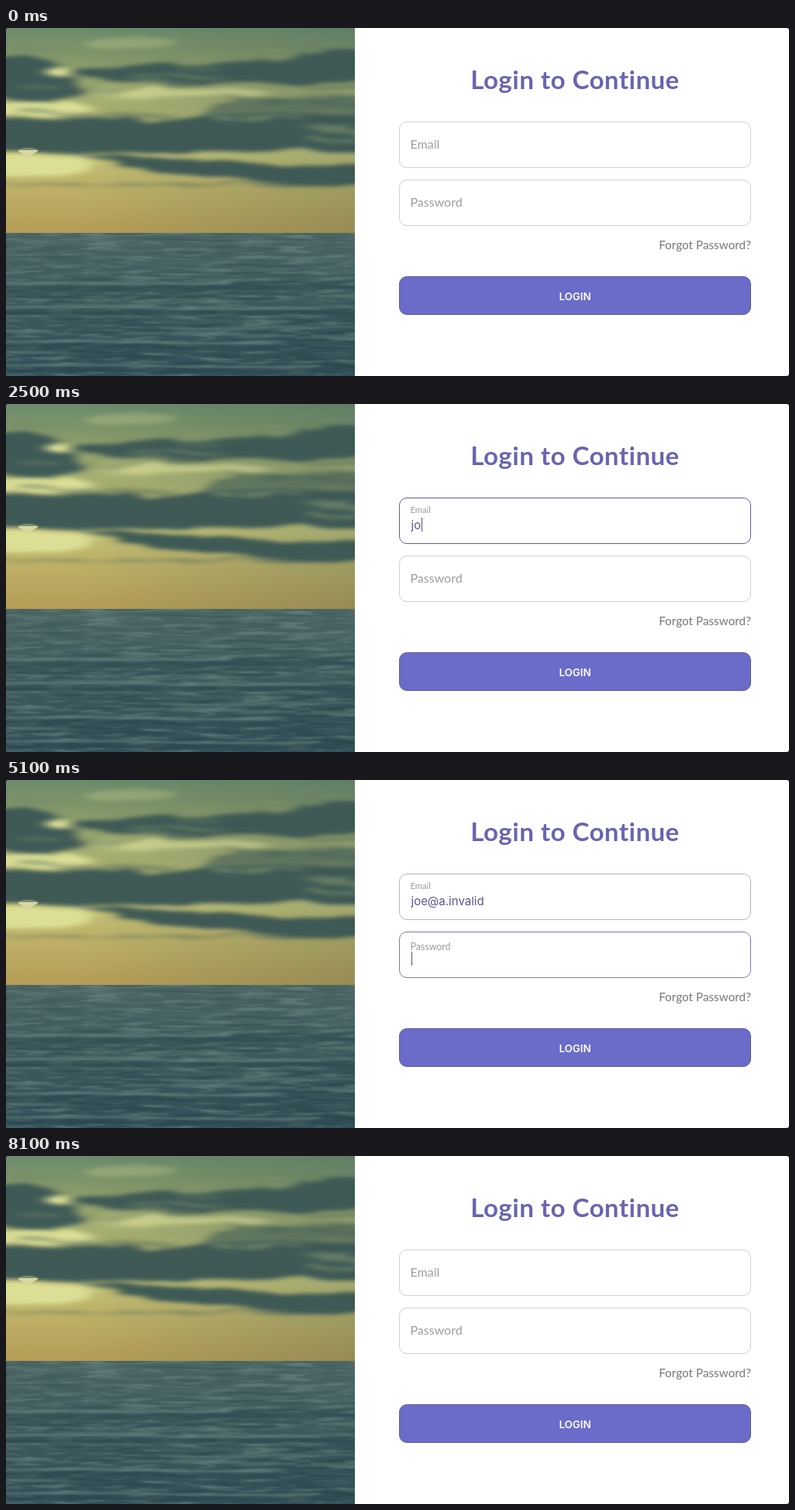
An HTML page that plays this animation: 1010 px wide and 450 px high, repeating every 8.2 s.

```html
<!DOCTYPE html>
<html lang="en">
<head>
<meta charset="utf-8">
<title>Login form</title>
<style>
  html, body { margin: 0; width: 100%; height: 100%; overflow: hidden; background: #fff; }
  svg { position: absolute; left: 0; top: 0; }
  #photo { will-change: transform; }
  filter { color-interpolation-filters: sRGB; }
  text { font-family: Lato, sans-serif; }
  .title { font-size: 33px; font-weight: 700; letter-spacing: .5px; fill: #6965b0; }
  .label { font-size: 16px; fill: #9b9b9f; }
  .link { font-size: 15.3px; fill: #77777b; }
  .button { font: 600 13.3px Inter, sans-serif; fill: #fff; }
  .value { font: 400 15px Inter, sans-serif; fill: #5c5494; }
</style>
</head>
<body>
<svg id="photo" width="450" height="450">
  <defs>
    <linearGradient id="sky" x2="0" y2="1">
      <stop offset="0" stop-color="#6c8b6c"/>
      <stop offset=".12" stop-color="#7f9569"/>
      <stop offset=".36" stop-color="#a5ad70"/>
      <stop offset=".62" stop-color="#c3c278"/>
      <stop offset=".75" stop-color="#bfb469"/>
      <stop offset="1" stop-color="#b59c55"/>
    </linearGradient>
    <linearGradient id="sea" x2="0" y2="1">
      <stop offset="0" stop-color="#4a6462"/>
      <stop offset=".5" stop-color="#3d595d"/>
      <stop offset="1" stop-color="#314e57"/>
    </linearGradient>
    <linearGradient id="shade">
      <stop offset=".2" stop-color="#3c5853" stop-opacity="0"/>
      <stop offset="1" stop-color="#3c5853" stop-opacity=".25"/>
    </linearGradient>
    <filter id="cloudy" x="-10%" y="-10%" width="120%" height="120%">
      <feTurbulence type="fractalNoise" baseFrequency=".012 .05" numOctaves="3" seed="4"/>
      <feDisplacementMap in="SourceGraphic" scale="16" xChannelSelector="R" yChannelSelector="G"/>
      <feGaussianBlur stdDeviation="8 2.6"/>
    </filter>
    <filter id="ripples" x="0" y="0" width="100%" height="100%">
      <feTurbulence type="fractalNoise" baseFrequency=".02 .2" numOctaves="4" seed="9"/>
      <feColorMatrix values="0 0 0 0 .46  0 0 0 0 .57  0 0 0 0 .54  3 0 0 0 -1.35"/>
    </filter>
    <filter id="soft" x="-10%" y="-10%" width="120%" height="120%">
      <feGaussianBlur stdDeviation="4 1.2"/>
    </filter>
  </defs>
  <rect width="450" height="266" fill="url(#sky)"/>
  <g filter="url(#cloudy)">
    <g fill="#3f5a56">
      <path d="M-20 36C40 32 70 48 90 65S110 92 60 95S10 93 -20 90Z"/>
      <path d="M80 56C140 38 200 50 290 44S400 30 470 26V64C390 76 330 68 260 74S140 70 80 56Z"/>
      <path d="M270 98C330 84 400 92 470 88V122H240Z" opacity=".6"/>
      <path d="M-20 118C90 112 150 124 230 116S330 108 470 108V160C360 163 260 156 180 162S60 160 -20 158Z"/>
      <path d="M85 169C180 163 250 176 470 178V204C340 206 230 190 85 169Z"/>
      <path d="M-20 201H470V204H-20Z" opacity=".5"/>
    </g>
    <g fill="#dbde95">
      <ellipse cx="65" cy="58" rx="16" ry="7"/>
      <ellipse cx="160" cy="20" rx="60" ry="6" opacity=".3"/>
      <ellipse cx="40" cy="104" rx="75" ry="8"/>
      <ellipse cx="220" cy="84" rx="120" ry="5" opacity=".8"/>
      <ellipse cx="0" cy="178" rx="110" ry="13"/>
    </g>
    <g id="wisps" fill="none" opacity=".4"></g>
  </g>
  <rect width="450" height="266" fill="url(#shade)"/>
  <path d="M15 158Q28 152 42 158Q28 171 15 158Z" fill="#d8d8a6"/>
  <path d="M15 158Q28 152 42 158Z" fill="#7d8a6b"/>
  <rect y="265" width="450" height="185" fill="url(#sea)"/>
  <rect y="265" width="450" height="185" filter="url(#ripples)" opacity=".5"/>
  <g id="waves" filter="url(#soft)" fill="none" opacity=".55"></g>
</svg>

<svg id="form" width="1010" height="450">
  <path d="M0 0h2L0 2ZM1008 0h2v2ZM1010 448v2h-2Z" fill="#333"/>
  <text class="title" x="734" y="79" text-anchor="middle">Login to Continue</text>
  <g id="fields"></g>
  <text class="link" x="961" y="286" text-anchor="end">Forgot Password?</text>
  <rect x="507.5" y="321.5" width="453" height="49" rx="9.5" fill="#6b6bc9" stroke="#5e5c9c"/>
  <text class="button" x="734" y="352" text-anchor="middle">LOGIN</text>
  <text class="value" id="value" x="522.5" y="162"></text>
  <rect id="caret" width="1" height="18" fill="#555566"/>
</svg>

<script>
const LOOP = 8200, STEP = 100, FADE = 200;
const EMAIL = 'joe@a.invalid', CLEARED = 6300;
const byId = id => document.getElementById(id);

// Spans are [from, to] in ms; a filled field keeps its label raised.
const fields = [
  { name: 'Email', top: 121.5, focus: [[500, 950], [1450, 5000], [5800, 7800]], raised: [[500, 950], [1450, 7800]] },
  { name: 'Password', top: 196.5, focus: [[950, 1450], [5000, 5800]], raised: [[950, 1450], [5000, 5800]] }
];

byId('fields').innerHTML = fields.map(f =>
  `<rect x="507.5" y="${f.top}" width="453" height="59" rx="9.5" fill="#fff"/>
   <text class="label">${f.name}</text>`).join('');
fields.forEach((f, i) => [f.box, f.label] = [...byId('fields').children].slice(i * 2, i * 2 + 2));

function paintPhoto() {
  let seed = 7;
  const random = () => (seed = seed * 16807 % 2147483647) / 2147483647;
  const streak = (x, y, length, color, width) => {
    const bend = (random() - .5) * 8;
    return `<path d="M${x} ${y}q${length / 4} ${bend} ${length / 2} 0t${length / 2} 0" stroke="${color}" stroke-width="${width}"/>`;
  };
  const scatter = (count, top, height, dark, light, thickness) => Array.from({ length: count }, () => {
    const depth = random();
    return streak(random() * 510 - 60, top + depth * height, 40 + random() * 130,
      random() < .6 ? dark : light, 1 + depth * thickness);
  }).join('');

  byId('wisps').innerHTML = scatter(45, 25, 130, '#3c5754', '#c3ca88', 5);
  byId('waves').innerHTML = scatter(110, 268, 180, '#294349', '#5f7975', 3) +
    [336, 368, 412, 443].map(y => streak(-20, y, 490, '#29454d', 7) +
      streak(-20, y - 6, 300 + random() * 190, '#728b87', 2.5)).join('');
}

const clamp = x => Math.max(0, Math.min(1, x));
const ease = x => 1 - (1 - clamp(x)) ** 2;
const level = (spans, t) => Math.max(...spans.map(([from, to]) => ease((t - from) / FADE) - ease((t - to) / FADE)));
const mix = (a, b, k) => a + (b - a) * k;

function typedCount(t) {
  if (t >= CLEARED) return 0;
  const count = t < 4300 ? (t - 1950) / 250 : 9 + (t - 4300) / 150;
  return Math.floor(Math.max(0, Math.min(EMAIL.length, count)));
}

function draw(t) {
  for (const f of fields) {
    const focus = level(f.focus, t), up = level(f.raised, t);
    const [r, g, b] = [[208, 98], [208, 92], [213, 152]].map(([from, to]) => mix(from, to, focus));
    f.box.setAttribute('stroke', `rgb(${r},${g},${b})`);
    f.label.setAttribute('transform', `translate(521.5 ${f.top + mix(34.5, 19.5, up)}) scale(${mix(1, .7, up)})`);
  }

  const value = byId('value'), caret = byId('caret');
  value.textContent = EMAIL.slice(0, typedCount(t));

  const active = fields.find(f => f.focus.some(([from, to]) => t >= from && t < to));
  caret.style.display = active ? '' : 'none';
  if (!active) return;
  const textWidth = active === fields[0] && value.textContent ? value.getComputedTextLength() : 0;
  caret.setAttribute('x', Math.round(523 + textWidth));
  caret.setAttribute('y', active.top + 25.5);
  const typing = t >= 2000 && t < 5000;
  const since = t - Math.max(...active.focus.map(([from]) => from).filter(from => from <= t), t >= CLEARED ? CLEARED : 0);
  if (!typing && since % 1000 >= 500) caret.style.display = 'none';
}

function tick() {
  draw(Math.floor(performance.now() % LOOP / STEP) * STEP);
  requestAnimationFrame(tick);
}

paintPhoto();
tick();
</script>
</body>
</html>
```
